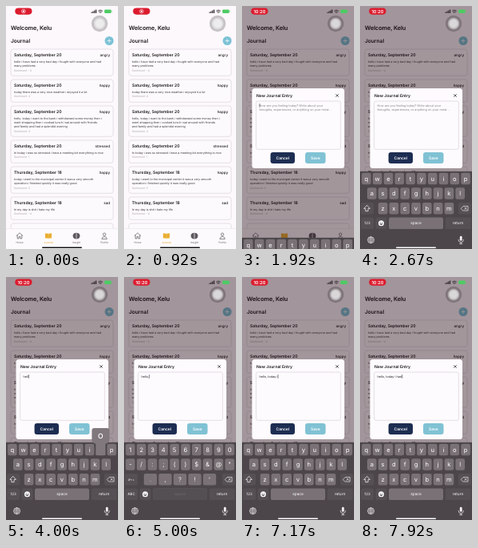
Write an HTML page that moves like this. It is 140 px wide and 304 px high and loops after 8000 ms.

```html
<!DOCTYPE html>
<html lang="en">
<head>
<meta charset="utf-8">
<title>Journal</title>
<style>
  html, body { margin: 0; width: 100%; height: 100%; overflow: hidden; background: #fcf8fc; }
  svg { display: block; width: 100vw; height: 100vh; }
  text { font-family: Inter, Roboto, sans-serif; white-space: pre; text-rendering: geometricPrecision; }
</style>
</head>
<body>
<svg id="stage" viewBox="0 0 140 304">
  <g id="page"></g>
  <g id="dialog">
    <rect width="140" height="304" fill="#1a0008" opacity=".4"/>
    <g id="box"></g>
  </g>
  <g id="keyboard">
    <rect y="206.8" width="140" height="100" fill="#4c464a"/>
    <g id="letters"></g>
    <g id="symbols"></g>
    <g id="common"></g>
    <rect id="spaceFlash" x="36" y="264.5" width="68" height="15" rx="2.2" fill="#4c464a" opacity=".8"/>
    <g id="popup">
      <path d="M-8 -27H8Q11 -27 11 -24V-12Q11 -9 6 -7V7H-6V-7Q-11 -9 -11 -12V-24Q-11 -27 -8 -27Z" fill="#80787c"/>
      <text id="popupText" y="-14" font-size="11.5" text-anchor="middle" fill="#fff"></text>
    </g>
  </g>
  <g id="status"></g>
</svg>
<script>
const LOOP = 8000;
const $ = id => document.getElementById(id);
const add = (id, markup) => $(id).insertAdjacentHTML('beforeend', markup);

const text = (x, y, size, str, { fill = '#1d1a1e', weight = 400, anchor = 'start', gap = 0 } = {}) =>
  `<text x="${x}" y="${y}" font-size="${size}" fill="${fill}" font-weight="${weight}" text-anchor="${anchor}" letter-spacing="${gap}">${str}</text>`;
const rect = (x, y, w, h, r, fill, extra = '') =>
  `<rect x="${x}" y="${y}" width="${w}" height="${h}" rx="${r}" fill="${fill}" ${extra}/>`;
const circle = (x, y, r, fill, extra = '') =>
  `<circle cx="${x}" cy="${y}" r="${r}" fill="${fill}" ${extra}/>`;
const stroke = (d, color, width = .7, fill = 'none') =>
  `<path d="${d}" fill="${fill}" stroke="${color}" stroke-width="${width}" stroke-linecap="round" stroke-linejoin="round"/>`;
const homeBar = fill => rect(45, 301.4, 50, 1.6, .8, fill);

// Journal page
const entries = [
  ['Saturday, September 20', 'angry', -4,
    'hello i have had a very bad day i fought with everyone and had', 'many problems'],
  ['Saturday, September 20', 'happy', 4, 'today there was a very nice weather i enjoyed it a lot'],
  ['Saturday, September 20', 'happy', 4,
    'hello, today i want to the bank i withdrawed some money then i',
    'went shopping then i cooked lunch i sat around with friends',
    'and family and had a splendid evening'],
  ['Saturday, September 20', 'stressed', 1,
    'hi today i was so stressed i have a meeting bit everything is nice'],
  ['Thursday, September 18', 'happy', 5,
    'today i want to the municipal center it was a very smooth',
    'operation i finished quickly it was really good'],
  ['Thursday, September 18', 'sad', -4, 'hi my day is shit i hate my life'],
];

add('page', rect(0, 0, 140, 304, 0, '#fcf8fc')
  + text(6, 29.8, 7.3, 'Welcome, Kelu', { weight: 600, gap: -.1 })
  + text(6, 46, 6.6, 'Journal', { weight: 600 })
  + circle(129, 43.5, 5.5, '#7cc2d6')
  + stroke('M127 43.5h4M129 41.5v4', '#fff', .7));

const card = (y, h) => rect(6, y, 128, h, 3, '#fdfafd', 'stroke="#d3ced4" stroke-width=".6"');
let cardTop = 54;
for (const [date, mood, score, ...lines] of entries) {
  const pitch = 28 + 5 * lines.length;
  add('page', card(cardTop, pitch - 4.7)
    + text(10, cardTop + 9.3, 5.1, date, { weight: 600 })
    + text(130, cardTop + 9.1, 4.5, mood, { anchor: 'end', weight: 500 })
    + lines.map((line, i) => text(10, cardTop + 16.8 + 5.3 * i, 3.7, line, { fill: '#3d393e' })).join('')
    + text(10, cardTop + 17 + 5.3 * lines.length, 3.4, `Sentiment: ${score}`, { fill: '#aaa5ab' }));
  cardTop += pitch;
}
add('page', card(cardTop, 30));

const tab = (x, label, icon, fill = '#6a666b') =>
  `<g transform="translate(${x} 287.6)">${icon}</g>` + text(x, 296.5, 3.3, label, { fill, anchor: 'middle' });
const gray = '#5d595e', orange = '#e8ab2c';
add('page', rect(0, 278, 140, 26, 0, '#fdfafd') + rect(0, 278, 140, .5, 0, '#e2dde3')
  + tab(17, 'Home', stroke('M-3.8 -.2L0 -3.8L3.8 -.2M-2.8 -1V3.4H-.9V.8H.9V3.4H2.8V-1', gray))
  + tab(53, 'Journal', stroke('M0 -2.6Q-2 -3.6 -4 -3V2.8Q-2 2.2 0 3.3Q2 2.2 4 2.8V-3Q2 -3.6 0 -2.6V3.3', '#f6d27c', .5, orange), orange)
  + tab(88, 'Insight', stroke('M-.6 -3.6A3.6 3.6 0 0 0 -.6 3.6Z', gray, .5, gray)
    + stroke('M.6 -3.6A3.6 3.6 0 0 1 .6 3.6Z', gray, .5, gray))
  + tab(123, 'Profile', circle(0, -1.9, 1.7, 'none', `stroke="${gray}" stroke-width=".7"`)
    + stroke('M-3.2 3.5Q-3 .9 0 .9T3.2 3.5Z', gray))
  + homeBar('#111'));

// Dialog
const white = { fill: '#fff', weight: 600, anchor: 'middle' };
const hint = { fill: '#858085' };
add('box', rect(12.5, 103, 115.5, 100, 3.5, '#fefbfe')
  + text(18, 113.8, 5.05, 'New Journal Entry', { weight: 600 })
  + stroke('M117.5 110.5l3 3m0 -3l-3 3', '#222', .7)
  + rect(17.7, 119, 105.6, 60.3, 2, '#fefbfe', 'stroke="#d0cbd1" stroke-width=".6"')
  + '<g id="hint">' + text(21.5, 125.8, 3.8, 'How are you feeling today? Write about your', hint)
  + text(21.5, 131.1, 3.8, 'thoughts, experiences, or anything on your mind...', hint) + '</g>'
  + '<text id="typed" x="21.5" y="125.8" font-size="3.85" fill="#222"></text>'
  + rect(0, 122, .6, 4.8, 0, '#3b3b52', 'id="caret"')
  + rect(35.6, 183, 30.4, 14, 3, '#1d2d52') + text(50.8, 191.7, 4.9, 'Cancel', white)
  + rect(79, 183, 25.5, 14, 3, '#80c2d4') + text(91.8, 191.7, 4.9, 'Save', white));

// Keyboard
const plain = '#797175', special = '#565054', ink = '#f4f0f3';
const rowY = [216, 234.5, 253.2, 271.8];
const keyCenter = {};
const key = (x, row, w, label, size = 7.6, fill = plain) =>
  rect(x - w / 2, rowY[row] - 7.3, w, 14.6, 2.2, fill)
  + text(x, rowY[row] + size * .34, size, label, { fill: '#fff', anchor: 'middle' });

function keyRow(layer, row, chars, pitch = 13.8, w = 11.6) {
  [...chars].forEach((c, i) => {
    const x = 70 + (i - (chars.length - 1) / 2) * pitch;
    keyCenter[c] = [x, rowY[row]];
    add(layer, key(x, row, w, c === '&' ? '&amp;' : c));
  });
}
['qwertyuiop', 'asdfghjkl', 'zxcvbnm'].forEach((chars, row) => keyRow('letters', row, chars));
keyRow('symbols', 0, '1234567890');
keyRow('symbols', 1, '-/:;()$&@"');
keyRow('symbols', 2, ".,?!'", 18.5, 16.3);

add('letters', key(9.2, 2, 16, '', 5, special) + stroke('M8.5 249.6L4.9 253.4H6.9V256.6H10.1V253.4H12.1Z', '#fff', .7)
  + key(9.2, 3, 16, '123', 4.5, special));
add('symbols', key(9.2, 2, 16, '#+=', 4, special) + key(9.2, 3, 16, 'ABC', 4.5, special));
add('common', key(130.8, 2, 16, '', 5, special)
  + stroke('M126.5 253.2L129 250.4H135V256H129ZM130.8 252l2.4 2.4m0 -2.4l-2.4 2.4', '#fff', .6)
  + key(26.5, 3, 14, '', 5, special)
  + circle(26.5, 271.8, 3.5, '#fff') + circle(25.2, 270.8, .5, special) + circle(27.8, 270.8, .5, special)
  + stroke('M24.6 272.6Q26.5 275.2 28.4 272.6Z', special, .4, special)
  + key(70, 3, 68, 'space', 4.8)
  + key(122.6, 3, 32, 'return', 4.8, special)
  + circle(13.6, 292.7, 4, 'none', `stroke="${ink}" stroke-width=".7"`)
  + stroke('M9.6 292.7h8m-4 -4v8m0 -8q-4 4 0 8q4 -4 0 -8m-2.8 1.7q2.8 1.3 5.6 0m-5.6 4.6q2.8 -1.3 5.6 0', ink, .5)
  + rect(124.8, 287.8, 2.8, 6, 1.4, ink)
  + stroke('M123 292.3Q123 295.8 126.2 295.8T129.4 292.3M126.2 295.8V297.6M124.6 297.6H127.8', ink, .7)
  + homeBar('#fff'));

// Status bar and floating touch button
add('status', rect(11.3, 2.5, 21.2, 8.2, 4.1, '#dc1b2e')
  + '<g id="recIcon">' + circle(21.9, 6.6, 2.4, 'none', 'stroke="#fff" stroke-width=".6"') + circle(21.9, 6.6, 1.2, '#fff') + '</g>'
  + '<g id="clock">' + text(21.9, 8.6, 5.6, '10:20', white) + '</g>'
  + [0, 1, 2, 3].map(i => rect(106.5 + i * 1.8, 7.4 - i, 1.2, 1.5 + i, .3, '#2a272a')).join('')
  + stroke('M115.5 6Q118 3.8 120.5 6M116.5 7.3Q118 6 119.5 7.3', '#2a272a', .8)
  + circle(118, 8.5, .6, '#2a272a')
  + rect(123, 4.4, 8.6, 4.6, 1.3, '#4ecb64') + rect(132, 5.9, .6, 1.6, .3, '#4ecb64')
  + circle(117, 22, 10.2, '#000', 'opacity=".21"')
  + [7.4, 6.2, 5].map(r => circle(117, 22, r, '#fff', 'opacity=".34"')).join(''));

// Typing: [release time, character]
const strokes = [
  [3500, 'h'], [3660, 'e'], [3800, 'l'], [3930, 'l'], [4075, 'o'], [4680, ','], [5080, ' '],
  [5400, 't'], [5590, 'o'], [5800, 'd'], [6020, 'a'], [6210, 'y'], [6860, ' '],
  [7080, 'i'], [7290, ' '], [7480, 'h'], [7670, 'a'], [7830, 'd'],
];
const HOLD = 100;
const clamp = v => Math.min(1, Math.max(0, v));
const show = (id, on) => $(id).setAttribute('visibility', on ? 'visible' : 'hidden');

function render(t) {
  $('dialog').setAttribute('opacity', clamp((t - 940) / 250));
  const slide = 1 - (1 - clamp((t - 1900) / 350)) ** 3;
  $('keyboard').setAttribute('transform', `translate(0 ${(1 - slide) * 100})`);
  show('keyboard', t > 1900);

  const numeric = t >= 4150 && t < 5080;
  $('letters').style.display = numeric ? 'none' : '';
  $('symbols').style.display = numeric ? '' : 'none';
  show('recIcon', t < 1700);
  show('clock', t >= 1700);

  const done = strokes.filter(([at]) => at <= t);
  const typed = done.map(([, c]) => c).join('');
  $('typed').textContent = typed;
  show('hint', !typed);

  const last = done.length ? done[done.length - 1][0] : 1900;
  $('caret').setAttribute('x', 21.7 + (typed ? $('typed').getComputedTextLength() : 0));
  show('caret', t > 1900 && (t - last) % 1060 < 640);

  const pressed = strokes.find(([at]) => t >= at - HOLD && t < at);
  const held = pressed ? pressed[1] : '';
  const letter = held.trim();
  show('popup', letter);
  if (letter) {
    const [x, y] = keyCenter[letter];
    $('popup').setAttribute('transform', `translate(${x} ${y})`);
    $('popupText').textContent = letter;
  }
  show('spaceFlash', held === ' ');
}

const start = performance.now();
function tick() {
  render((performance.now() - start) % LOOP);
  requestAnimationFrame(tick);
}
tick();
</script>
</body>
</html>
```
